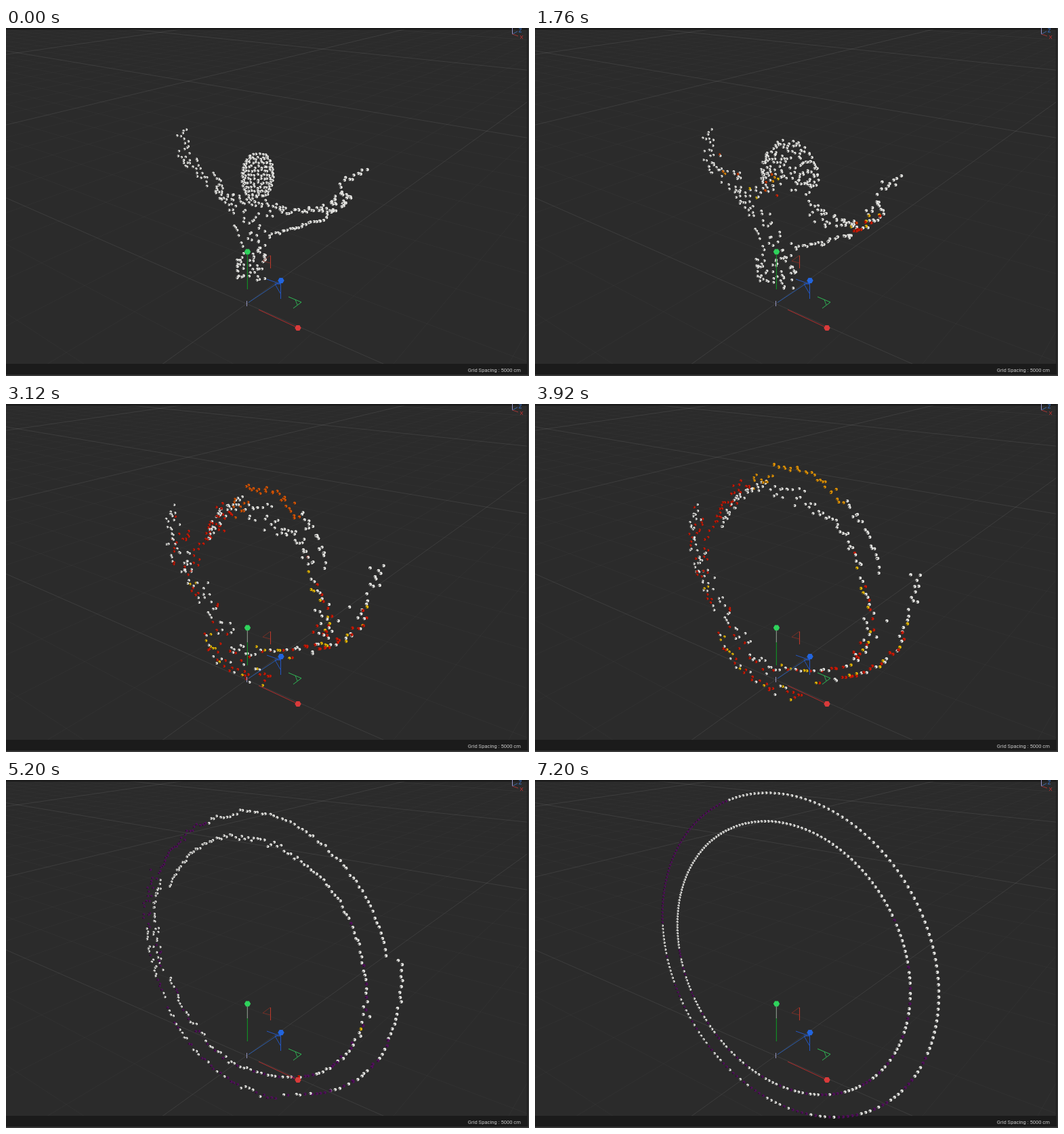
An HTML page with a canvas that plays this animation: 772 px wide and 514 px high, repeating every 7280 ms.

```html
<!DOCTYPE html>
<html lang="en">
<head>
<meta charset="utf-8">
<title>Particle morph</title>
<style>
  html, body { margin: 0; width: 100%; height: 100%; overflow: hidden; background: #2b2b2b; }
  canvas { display: block; position: absolute; left: 0; top: 0; }
  p { position: absolute; right: 12px; top: 500px; margin: 0; white-space: nowrap;
      font: 7.6px/11px Roboto, sans-serif; color: #c8c8c8; }
</style>
</head>
<body>
<canvas id="view" width="772" height="514"></canvas>
<p>Grid Spacing : 5000 cm</p>
<script>
const W = 772, H = 514, STEP = 80, LOOP = 7280, TAU = Math.PI * 2;
const ctx = document.getElementById('view').getContext('2d');

let seed = 41;
function rnd() {
  seed = (seed + 0x6D2B79F5) | 0;
  let v = Math.imul(seed ^ (seed >>> 15), 1 | seed);
  v = (v + Math.imul(v ^ (v >>> 7), 61 | v)) ^ v;
  return ((v ^ (v >>> 14)) >>> 0) / 4294967296;
}
const jitter = size => (rnd() - 0.5) * size;
const clamp = v => Math.max(0, Math.min(1, v));
const smooth = v => v * v * (3 - 2 * v);

// ---- Figure ----
const points = [];
const add = (x, y) => points.push({ x, y });

function limb(x0, y0, x1, y1, w0, w1, n) {
  const len = Math.hypot(x1 - x0, y1 - y0);
  const nx = (y0 - y1) / len, ny = (x1 - x0) / len;
  for (let i = 0; i < n; i++) {
    const k = (i + rnd()) / n;
    const off = jitter(w0 + (w1 - w0) * k);
    add(x0 + (x1 - x0) * k + nx * off, y0 + (y1 - y0) * k + ny * off);
  }
}

function head() {
  const rows = 10, cols = 14;
  for (let r = 0; r < rows; r++) {
    const v = (r + 0.5) / rows * 2 - 1;
    const rx = 23 * Math.sqrt(1 - v * v * (v < 0 ? 0.85 : 0.55));
    for (let c = 0; c < cols; c++) {
      const a = (c + 0.5 * (r % 2)) / cols * TAU;
      add(371.5 + rx * Math.cos(a) + jitter(2) - v, 217 + 30 * v + 4 * Math.sin(a) + jitter(2));
    }
  }
}

head();
limb(371, 244, 371, 264, 22, 34, 18);
// raised arm
limb(260, 147, 259, 190, 25, 25, 14);
limb(262, 188, 270, 204, 10, 10, 8);
limb(272, 194, 316, 238, 20, 22, 24);
limb(308, 236, 348, 266, 18, 32, 34);
// extended arm
limb(386, 256, 412, 272, 14, 14, 8);
limb(402, 271, 468, 269, 9, 9, 22);
limb(388, 307, 474, 281, 4, 4, 24);
limb(468, 272, 507, 245, 18, 20, 34);
limb(490, 235, 532, 206, 18, 16, 11);
// torso and hips
limb(367, 268, 366, 332, 72, 44, 35);
for (let i = 0; i < 46; i++) {
  const a = rnd() * TAU;
  add(362 + 21 * Math.cos(a), 336 + (i % 7) * 5.6 + 3 * Math.sin(a) + jitter(2));
}

// ---- Rings ----
const RINGS = [
  { cx: 392, cy: 258.5, rx: 204, ry: 239.5 },
  { cx: 382, cy: 263, rx: 172, ry: 202 }
];
const TILT = 0.2475, SQUEEZE = 0.3, FIRST = 1.5;
const half = points.length / 2;

function ringAngle(i) {
  const u = FIRST + (i + 0.5) / half * TAU;
  return (u + SQUEEZE * Math.sin(u)) % TAU;
}

const WHITE = 0, YELLOW = 1, ORANGE = 2, RED = 3;
const inRedArc = (ring, a) => ring === 0 && a > 3.08 && a < 4.17;

function kindAt(ring, a) {
  if (inRedArc(ring, a)) return RED;
  if (ring === 0) {
    if (a >= 4.17 && a < 5.33) return ORANGE;
    if (a < 0.25 || a > 2.9) return WHITE;
  } else if (a > 2.95 && a < 5.75) return WHITE;
  const chance = ring === 0 && a > 1.1 && a < 2 ? 0.5 : 0.32;
  const r = rnd();
  return r < chance ? RED : r < chance + 0.1 ? YELLOW : WHITE;
}

function land(p, ring, i) {
  const a = ringAngle(i), o = RINGS[ring];
  p.tx = o.cx + o.rx * Math.cos(a);
  p.ty = o.cy + o.ry * Math.sin(a + TILT);
  p.kind = kindAt(ring, a);
  const dist = Math.hypot(1.2 * (p.tx - p.x), p.ty - p.y);
  p.on = Math.max(0.13, Math.min(0.36, 0.37 - (dist - 150) * 0.0026));
  p.off = 0.58 + 0.18 * rnd();
  if (inRedArc(ring, a)) { p.on = 0.17 + 0.15 * rnd(); p.off = 0.68; }
  if (p.kind === ORANGE) { p.on = 0.3; p.off = 0.66; }
  p.spin = 2.2 + rnd() * 1.2;
}

// Match figure to rings by direction, in blocks split by distance.
for (const p of points) {
  const dx = p.x - 378, dy = p.y - 285;
  p.dir = (Math.atan2(dy, dx) - Math.PI / 2 + TAU) % TAU + jitter(0.2);
  p.far = Math.hypot(dx, dy) + jitter(12);
}
points.sort((a, b) => a.dir - b.dir);
const BLOCK = 36;
for (let s = 0; s < points.length; s += BLOCK) {
  const block = points.slice(s, s + BLOCK).sort((a, b) => b.far - a.far);
  const n = block.length / 2, mid = ringAngle(s / 2 + n / 2);
  const flip = mid > 2.6 && mid < 4.2;
  [block.slice(0, n), block.slice(n)].forEach((group, g) => {
    group.sort((a, b) => a.dir - b.dir);
    group.forEach((p, i) => land(p, flip ? 1 - g : g, s / 2 + i));
  });
}

function tone(p, q) {
  if (p.kind === WHITE || q < p.on) return '#e4e4e1';
  if (q > p.off) return p.kind === RED ? '#520f5c' : '#e4e4e1';
  let heat = 0.1;
  if (p.kind === RED) heat = clamp((q - p.on) / 0.05);
  if (p.kind === ORANGE) heat = (p.off - q) / (p.off - p.on);
  return `hsl(${52 - 46 * heat},96%,${46 - 5 * heat}%)`;
}

function dot(c, x, y, r, fill) {
  c.fillStyle = fill;
  c.beginPath();
  c.arc(x, y, r, 0, TAU);
  c.fill();
}

function line(c, color, width, ...xy) {
  c.strokeStyle = color;
  c.lineWidth = width;
  c.beginPath();
  for (let i = 0; i < xy.length; i += 2) c.lineTo(xy[i], xy[i + 1]);
  c.stroke();
}

// ---- Backdrop ----
const back = document.createElement('canvas');
back.width = W;
back.height = H;

function drawBack(c) {
  c.fillStyle = '#2b2b2b';
  c.fillRect(0, 0, W, H);
  const fan = (vx, vy, axis, gap) => {
    for (let k = -10; k <= 40; k++) {
      const major = k % 10 === 0;
      const alpha = major ? (k > 20 ? 0.05 : 0.095) : 0.03 * (1 - Math.max(0, k) / 55);
      const x = axis + k * gap, far = 2;
      line(c, `rgba(255,255,255,${alpha})`, 0.9, vx, vy, vx + (x - vx) * far, vy + (500 - vy) * far);
    }
  };
  fan(-795, -99, 566, 222.6);
  fan(1084, -117, 226, -171.3);
  c.fillStyle = '#1b1b1b';
  c.fillRect(0, 0, W, 2.5);
  c.fillRect(0, 496, W, 16);
  c.fillRect(769, 0, 1.5, H);
  c.fillStyle = '#383838';
  c.fillRect(0, 512, W, 2);
  c.fillRect(770.5, 0, 1.5, H);
  // corner axes
  line(c, '#9a9ad0', 1, 747.5, 0, 747.5, 9);
  line(c, '#3f69a8', 1, 747.5, 9, 755, 5);
  line(c, '#a33636', 1, 747.5, 9, 756, 12);
  line(c, '#3267b5', 1, 757, 1, 761, 1, 757, 6, 761, 6);
  line(c, '#b03030', 1, 759, 11, 763, 16);
  line(c, '#b03030', 1, 763, 11, 759, 16);
}
drawBack(back.getContext('2d'));

// ---- Handles ----
function knob(x, y, color) {
  ctx.fillStyle = color;
  ctx.beginPath();
  for (let i = 0; i < 6; i++) {
    const a = i * TAU / 6;
    ctx.lineTo(x + 4.7 * Math.cos(a), y + 4.7 * Math.sin(a));
  }
  ctx.fill();
}

function drawHandles(t) {
  line(ctx, '#128a25', 1.2, 356.4, 331, 356.4, 386);
  if (t >= 2400) line(ctx, '#858585', 1.2, 356.4, 334, 356.4, 352);
  line(ctx, '#2859a8', 1, 358, 405.5, 406, 373.5);
  line(ctx, '#2456c0', 1.1, 405.5, 376, 405.5, 400);
  line(ctx, '#2456c0', 1, 385, 371, 405, 378, 397, 378, 405, 392);
  line(ctx, '#b02b2b', 1, 373, 416, 431, 443);
  line(ctx, '#b8392a', 1.1, 390.5, 336, 390.5, 355);
  line(ctx, '#7d3028', 0.9, 390, 336, 379, 344, 390, 347);
  line(ctx, '#2fb855', 1, 417, 397, 436, 405, 424, 414);
  line(ctx, '#2fb855', 0.9, 427, 401, 430, 409);
  line(ctx, '#9292bd', 1, 355.5, 403, 355.5, 411);
  knob(356.5, 330.5, '#2fd35c');
  knob(406, 373, '#2265de');
  knob(431, 443, '#d93a3a');
}

function draw(t) {
  const q = clamp((t / 7200 - 0.05) / 0.89), e = smooth(q);
  ctx.drawImage(back, 0, 0);
  for (const p of points) {
    const x = p.x + (p.tx - p.x) * e, y = p.y + (p.ty - p.y) * e;
    const near = clamp((x - 190) / 400);
    const r = 1.7 + 0.75 * near;
    dot(ctx, x, y, r, tone(p, q));
    dot(ctx, x + r * 0.6 * Math.cos(p.spin), y + r * 0.6 * Math.sin(p.spin), r * (0.52 - 0.14 * near), 'rgba(20,20,20,.75)');
  }
  drawHandles(t);
}

const start = performance.now();
function tick() {
  const t = (performance.now() - start) % LOOP;
  draw(Math.floor(t / STEP) * STEP);
  requestAnimationFrame(tick);
}
tick();
</script>
</body>
</html>
```
